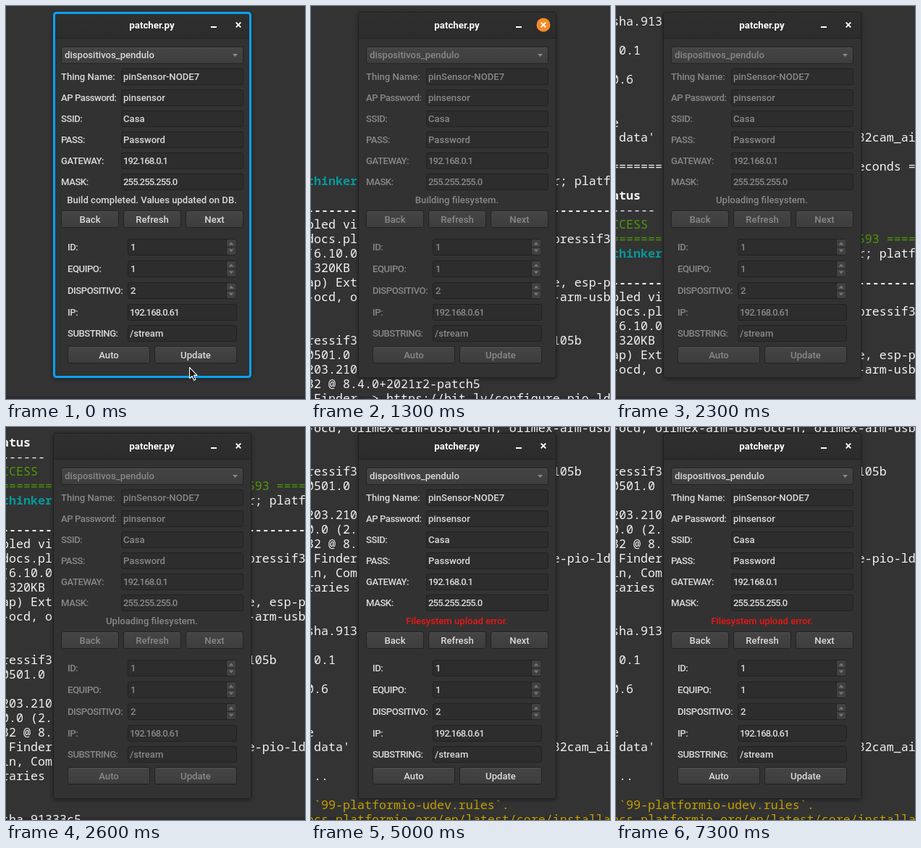
An HTML page that plays this animation: 413x542 px, repeating every 7.6 s.

```html
<!DOCTYPE html>
<html lang="en">
<head>
<meta charset="utf-8">
<title>patcher.py</title>
<style>
  html, body { margin: 0; width: 100%; height: 100%; overflow: hidden; background: #333; }
  svg { display: block; width: 413px; height: 542px; }
  text { white-space: pre; }
  #term text { font: 16.667px "Noto Sans Mono", "DejaVu Sans Mono", monospace; fill: #f2f2f2; }
  #term .bold { font-weight: 700; }
  #dialog text { font: 500 13.1px Roboto, "Noto Sans", sans-serif; fill: var(--ink); }
  #dialog .caps { letter-spacing: -.45px; }
  #dialog .num { letter-spacing: -.85px; }
  #dialog .title { font-size: 13.3px; font-weight: 700; fill: #fff; }
  .mid { text-anchor: middle; }
  .field { fill: #2d2d2d; stroke: #222; }
  .button { fill: url(#face); stroke: #232323; }
  .hot { fill: #4d4d4d; }
  .pressed { fill: #292929; }
</style>
</head>
<body>
<svg id="stage" viewBox="0 0 413 542" xmlns="http://www.w3.org/2000/svg">
  <defs>
    <linearGradient id="face" x2="0" y2="1">
      <stop stop-color="#454545"/><stop offset="1" stop-color="#3d3d3d"/>
    </linearGradient>
    <linearGradient id="bar" x2="0" y2="1">
      <stop stop-color="#2f2f2f"/><stop offset="1" stop-color="#2c2c2c"/>
    </linearGradient>
    <filter id="shadow" x="-20%" y="-20%" width="140%" height="140%">
      <feDropShadow dx="0" dy="2" stdDeviation="3" flood-color="#000" flood-opacity=".35"/>
    </filter>
  </defs>
  <rect width="413" height="542" fill="#333"/>
  <rect y="538" width="413" height="4" fill="#2c2c2c"/>
  <g id="term"></g>
  <g id="dialog"></g>
  <path id="cursor" d="M.5 .5V15.5L4 12.3L6.6 18.2L9 17.1L6.5 11.4H11Z"
    fill="#1c1c1c" stroke="#fff" stroke-width="1.1" stroke-linejoin="round"/>
</svg>
<script>
const LOOP = 7600, ROW = 20, COLS = 42;
const $ = id => document.getElementById(id);

function add(parent, tag, attrs, text) {
  const el = document.createElementNS("http://www.w3.org/2000/svg", tag);
  for (const key in attrs) el.setAttribute(key, attrs[key]);
  if (text !== undefined) el.textContent = text;
  parent.append(el);
  return el;
}

// ---- Terminal output ----
const CYAN = "#06989a", GREEN = "#4e9a06", YELLOW = "#c4a000";
const split = (left, right, end = COLS) => left.padEnd(end - right.length) + right;
const rule = (left, right, ch) => left.padEnd(COLS - right.length, ch) + right;

const header = [
  [["thinker", CYAN, "bold"], [split(" (board: esp32cam; framewor", "r; platf", COLS - 7)]],
  "",
  [["-".repeat(COLS), "#f2f2f2", "bold"]],
  "bled via `-v, --verbose` option",
  "docs.platformio.org/page/boards/espressif3",
  "(6.10.0)",
  " 320KB RAM, 4MB Flash",
  "ap) External (cmsis-dap, esp-bridge, esp-p",
  "-ocd, olimex-arm-usb-ocd-h, olimex-arm-usb",
  "", "",
  split("ressif32 @ 3.20005.22", "105b", 38),
  "0501.0"
];
const deps = [
  "32 @ 8.4.0+2021r2-patch5",
  " Finder -> https://bit.ly/configure-pio-ld",
  "in, Compatibility ~ soft",
  "raries", "", "",
  "sha.91333c5", "",
  ".0.1", "",
  "0.6", "", "",
  "e",
  "'data' directory to .pio/build/esp32cam_ai"
];
const lines = [
  ...header, "203.210", ...deps, "",
  [[rule("======= [", "SUCCESS] Took 3.59 seconds =", "=")]],
  "",
  [["atus    Duration", "#f2f2f2", "bold"]],
  "------  ------------",
  [["CCESS", GREEN], ["   00:00:03.593"]],
  [[rule("=======", " 1 succeeded in 00:00:03.593 ====", "="), GREEN]],
  ...header, "", "203.210", "0.0 (2.0.0)", ...deps, "",
  "...", "",
  [[" `99-platformio-udev.rules`.", YELLOW]],
  [["ocs.platformio.org/en/latest/core/installa", YELLOW]]
];

lines.forEach((line, i) => {
  const row = add($("term"), "text", { x: -6, y: i * ROW + 6 });
  const parts = typeof line === "string" ? [[line]] : line;
  for (const [text, fill = "#f2f2f2", cls = ""] of parts)
    add(row, "tspan", { style: "fill:" + fill, class: cls }, text);
});

// ---- Dialog ----
const dialog = $("dialog");
const box = (x, y, w, h, cls) =>
  add(dialog, "rect", { x: x + .5, y: y + .5, width: w - 1, height: h - 1, rx: 2.5, class: cls });
const label = (x, y, text, cls = "") => add(dialog, "text", { x, y: y + 4.7, class: cls }, text);
const arrow = (x, y, up, fill = "#747474") =>
  add(dialog, "path", { d: `M${x - 3.5} ${y}h7l-3.5 ${up ? -4 : 4}z`, fill });

// The dark outline lies just outside the face.
function button(x, y, w, text) {
  const el = box(x - 1, y - 1, w + 2, 24, "button");
  add(dialog, "path", { d: `M${x + 2} ${y + .5}h${w - 4}`, stroke: "#505050" });
  label(x + w / 2, y + 11, text, "mid");
  return el;
}

add(dialog, "rect", { x: 65, y: 8, width: 274, height: 505, rx: 4, fill: "#303030", filter: "url(#shadow)" });
add(dialog, "path", { d: "M65 44V12q0-4 4-4h266q4 0 4 4v32z", fill: "url(#bar)" });
add(dialog, "path", { d: "M65 44.5h274", stroke: "#222" });
const edge = add(dialog, "rect", { fill: "none", rx: 3 });

function setEdge(width, stroke) {
  const attrs = {
    x: 65 + width / 2, y: 8 + width / 2, width: 274 - width, height: 505 - width,
    stroke, "stroke-width": width
  };
  for (const key in attrs) edge.setAttribute(key, attrs[key]);
}

label(201.5, 26, "patcher.py", "title mid");
add(dialog, "rect", { x: 283, y: 28, width: 8, height: 2, fill: "#fff" });
const closeDisc = add(dialog, "circle", { cx: 321, cy: 26, r: 9.5, fill: "#f68b28" });
add(dialog, "path", { d: "M317.7 22.7l6.6 6.6m0-6.6l-6.6 6.6", stroke: "#fff", "stroke-width": 1.9 });

button(77, 57, 250, "");
label(81, 67, "dispositivos_pendulo");
arrow(316.5, 66, false, "#8a8a8a");

[
  ["Thing Name:", "pinSensor-NODE7"],
  ["AP Password:", "pinsensor"],
  ["SSID:", "Casa"],
  ["PASS:", "Password"],
  ["GATEWAY:", "192.168.0.1"],
  ["MASK:", "255.255.255.0"]
].forEach(([name, value], i) => {
  const y = 97 + i * 29;
  label(76, y, name, i ? "caps" : "");
  box(159, y - 11, 169, 23, "field");
  label(162, y, value, i > 3 ? "num" : "");
});

const status = label(201.5, 267, "", "mid");
["Back", "Refresh", "Next"].forEach((text, i) => button(77 + i * 86, 283, 78, text));

[["ID:", "1"], ["EQUIPO:", "1"], ["DISPOSITIVO:", "2"]].forEach(([name, value], i) => {
  const y = 332 + i * 30;
  label(85, y, name, "caps");
  box(168, y - 11, 150, 23, "field");
  label(172, y, value);
  add(dialog, "rect", { x: 305, y: y - 10, width: 12.5, height: 21, rx: 2, fill: "#414141" });
  add(dialog, "path", { d: `M304.5 ${y - 10}v21M305 ${y + .5}h12`, stroke: "#262626", fill: "none" });
  arrow(311, y - 2.5, true);
  arrow(311, y + 3.5, false);
});

[["IP:", "192.168.0.61", "num"], ["SUBSTRING:", "/stream", ""]].forEach(([name, value, cls], i) => {
  const y = 422 + i * 29;
  label(85, y, name, "caps");
  box(168, y - 11, 151, 23, "field");
  label(171, y, value, cls);
});

button(86, 470, 112, "Auto");
const update = button(206, 470, 112, "Update");

// ---- Timeline: [start ms, value] ----
const at = (keys, t) => keys.reduce((found, [start, value]) => t >= start ? value : found, null);

const scroll = [
  [0, 600], [800, 541], [900, 501], [1000, 461], [1300, 241], [1400, 121], [2000, 61],
  [2200, -159], [2300, -379], [2600, -619], [4800, -659], [4900, -779], [5000, -879]
];
const messages = [
  [0, "Build completed. Values updated on DB."],
  [300, "Building filesystem."],
  [1800, "Uploading filesystem."],
  [5000, "Filesystem upload error."]
];
const pointer = [
  [0, [253, 498]], [100, [257, 485]], [300, [274, 390]], [400, [318, 24]], [500, null]
];

function pointerAt(t) {
  if (t < 6700) return at(pointer, t);
  if (t >= 7300) return null;
  const k = Math.floor((t - 6700) / 100) / 5;
  return [49 + 250 * k, 504 - 508 * k * (.7 + .3 * k)];
}

function draw(t) {
  const busy = t >= 300 && t < 5000;
  $("term").setAttribute("transform", `translate(0 ${at(scroll, t)})`);
  dialog.style.setProperty("--ink", busy ? "#888" : "#dadada");
  status.textContent = at(messages, t);
  status.style.fill = t >= 5000 ? "#ee1515" : "";
  if (t < 500) setEdge(3, "#0aa2f8");
  else setEdge(1, "#202020");
  closeDisc.style.display = t >= 400 && t < 2300 ? "" : "none";
  update.setAttribute("class", "button" + at([[0, ""], [100, " hot"], [200, " pressed"], [300, ""]], t));
  const pos = pointerAt(t);
  $("cursor").style.display = pos ? "" : "none";
  if (pos) $("cursor").setAttribute("transform", `translate(${pos})`);
}

function tick() {
  draw(performance.now() % LOOP);
  requestAnimationFrame(tick);
}
tick();
</script>
</body>
</html>
```
